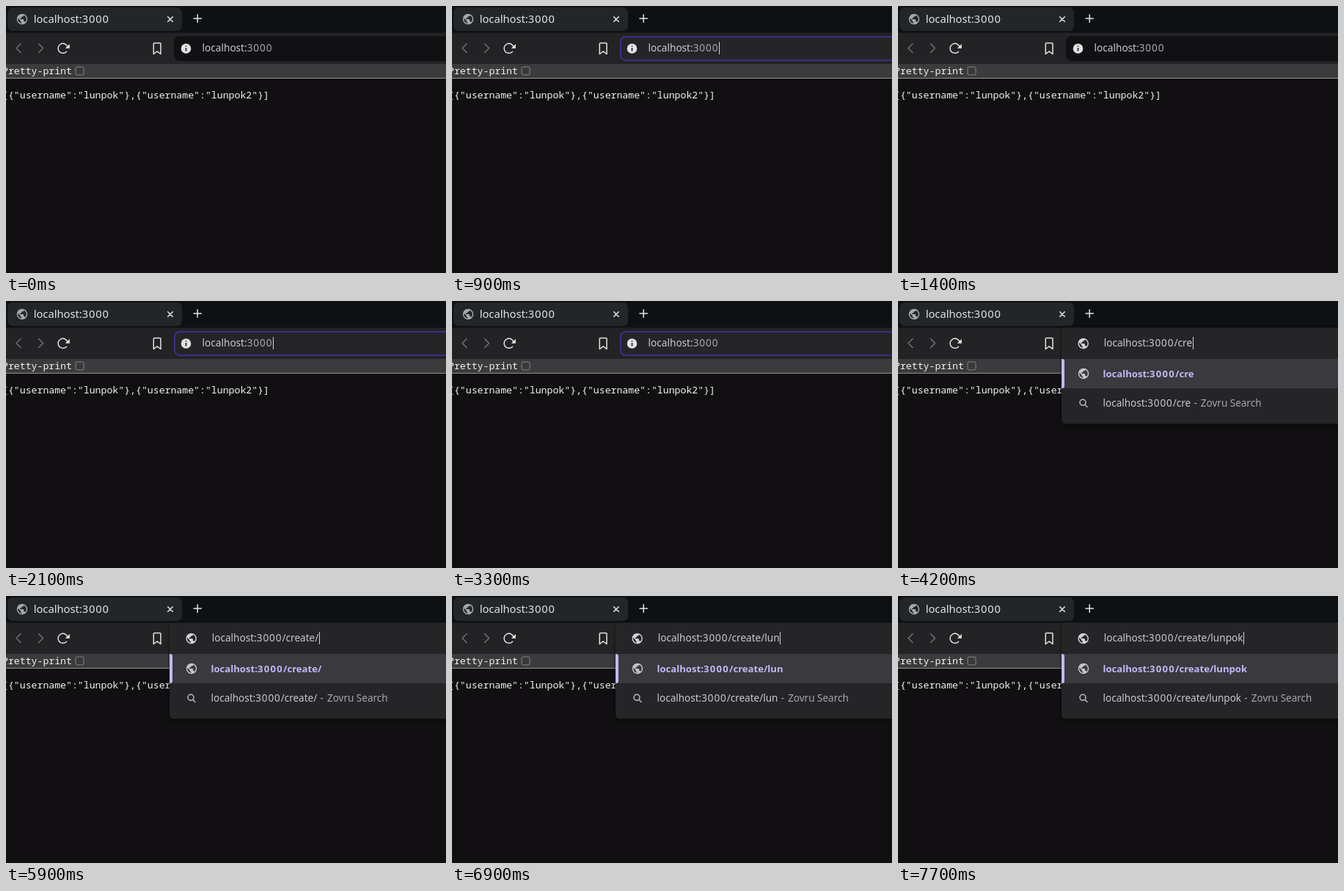
Recreate the animation shown at these times as an HTML page. Size 600 px wide and 364 px high, loop 8 s.

```html
<!DOCTYPE html>
<html lang="en">
<head>
<meta charset="utf-8">
<style>
  html, body { margin: 0; width: 100%; height: 100%; overflow: hidden; background: #110f11; }
  svg { display: block; width: 600px; height: 364px; }
  text { font: 13.6px "Noto Sans", "Open Sans", sans-serif; fill: #cacacd; white-space: pre; }
  .port { letter-spacing: .9px; }
  .tab { font-size: 14.7px; fill: #e2e3e5; }
  .mono { font: 13.2px "Noto Sans Mono", "DejaVu Sans Mono", monospace; fill: #f4f4f4; }
  .match { font-size: 13.1px; font-weight: 700; fill: #bfbaf8; }
  .match .port { letter-spacing: 1.3px; }
  .query { font-size: 13.5px; }
  .dash { letter-spacing: .8px; }
  .dim { fill: #a8a8ac; }
  .line { fill: none; stroke: #e4e4e6; stroke-width: 1.5; stroke-linecap: round; stroke-linejoin: round; }
  .faint { stroke: #717175; }
  .selected, .selected tspan { fill: #101012; }
</style>
</head>
<body>
<svg viewBox="0 0 600 364">
  <defs>
    <path id="globe" transform="scale(.72) translate(-12 -12)" d="M12 2C6.48 2 2 6.48 2 12s4.48 10 10 10 10-4.48 10-10S17.52 2 12 2zm-1 17.93c-3.95-.49-7-3.85-7-7.93 0-.62.08-1.21.21-1.79L9 15v1c0 1.1.9 2 2 2v1.93zm6.9-2.54c-.26-.81-1-1.39-1.9-1.39h-1v-3c0-.55-.45-1-1-1H8v-2h2c.55 0 1-.45 1-1V7h2c1.1 0 2-.9 2-2v-.41c2.93 1.19 5 4.06 5 7.41 0 2.08-.8 3.97-2.1 5.39z"/>
    <filter id="shadow" x="-5%" y="-5%" width="110%" height="115%"><feGaussianBlur stdDeviation="2"/></filter>
  </defs>

  <!-- Tab strip and toolbar -->
  <rect width="600" height="37" fill="#0d1113"/>
  <rect x="2" y="2" width="238" height="32" rx="7" fill="#232629"/>
  <use href="#globe" x="22" y="18" fill="#a6a8ab"/>
  <text class="tab" x="37.700" y="23.300">localhost:<tspan class="port">3000</tspan></text>
  <path class="line" d="M220.700 14.700l6.600 6.600m0-6.600l-6.600 6.600M256 17h10.400m-5.200-5.200v10.400"/>
  <rect y="36.500" width="600" height="42.500" fill="#232325"/>
  <path class="line faint" d="M20 51.500l-6 6 6 6M44.500 51.500l6 6-6 6"/>
  <path class="line" d="M82.500 62.200a6.600 6.600 0 1 1 1.500-6.200"/>
  <path d="M80.800 57.800h6v-6z" fill="#e4e4e6"/>
  <path class="line" d="M201.300 51.500q0-1 1-1h7.700q1 0 1 1v14l-4.850-3.600-4.850 3.600z"/>

  <!-- Page -->
  <rect y="79" width="600" height="19" fill="#3b3a3c"/>
  <rect y="98" width="600" height="1" fill="#929293"/>
  <text class="mono" x="-5" y="93">Pretty-print</text>
  <rect x="95" y="83" width="11" height="11" rx="2" fill="#39383a" stroke="#858587"/>
  <text class="mono" x="-5" y="126">[{"username":"lunpok"},{"username":"lunpok2"}]</text>

  <!-- Address field -->
  <rect id="field" x="230" y="42" width="390" height="32" rx="7" stroke-width="2"/>
  <g id="info">
    <circle cx="245.500" cy="58" r="6.800" fill="#e3e3e5"/>
    <path d="M245.500 57v4.500M245.500 54v1.200" stroke="#202023" stroke-width="1.700"/>
  </g>

  <!-- Suggestions -->
  <g id="popup">
    <rect x="223" y="38" width="390" height="131" rx="5" opacity=".6" filter="url(#shadow)"/>
    <rect x="223" y="36.500" width="390" height="131" rx="5" fill="#252528"/>
    <rect x="223" y="79" width="377" height="40" fill="#3a393d"/>
    <path d="M223 79h1q3 0 3 3v34q0 3-3 3h-1z" fill="#bfbaf8"/>
    <use href="#globe" x="252.700" y="58" fill="#d3d3d6"/>
    <use href="#globe" x="253" y="99" fill="#c4c4c8"/>
    <path class="line" style="stroke:#bcbcc0" d="M255 141.500l3 3M256 138.300a4 4 0 1 1-8 0 4 4 0 0 1 8 0z"/>
    <text class="match" x="279.500" y="103.800">localhost:<tspan class="port">3000</tspan><tspan class="path"></tspan></text>
    <text class="query" x="279.500" y="144.300">localhost:<tspan class="port">3000</tspan><tspan class="path"></tspan><tspan class="dim"><tspan class="dash"> - </tspan>Zovru Search</tspan></text>
  </g>

  <rect id="highlight" x="268" y="48" height="19" fill="#bfbaf8"/>
  <text id="url" y="62.300">localhost:<tspan id="port" class="port">3000</tspan><tspan class="path"></tspan></text>
  <rect id="caret" y="49" width="1" height="17" fill="#d2d2d5"/>
</svg>
<script>
  const LOOP = 8000, BLINK = 500, POPUP = 3700;
  const typed = "/create/lunpok";
  const keyTimes = [3600, 3800, 4000, 4200, 4500, 4600, 4900, 5900, 6500, 6700, 6900, 7200, 7300, 7700];
  const $ = id => document.getElementById(id);
  const show = (id, on) => $(id).setAttribute("visibility", on ? "visible" : "hidden");
  const paths = document.querySelectorAll(".path");
  const within = (t, from, to) => t >= from && t < to;

  function draw(t) {
    const focused = within(t, 900, 1400) || t >= 2100;
    const selected = within(t, 1100, 1400) || within(t, 2300, 2800);
    const open = t >= POPUP;
    const count = keyTimes.filter(k => k <= t).length;

    paths.forEach(p => p.textContent = typed.slice(0, count));
    $("field").setAttribute("fill", focused ? "#252528" : "#111114");
    $("field").setAttribute("stroke", focused ? "#393088" : "#111114");
    show("info", !open);
    show("popup", open);

    const x = open ? 280.7 : 267.6;
    $("url").setAttribute("x", x);
    $("url").setAttribute("class", selected ? "selected" : "");
    $("port").setAttribute("class", count ? "port" : "port dim");
    const width = $("url").getComputedTextLength();
    $("highlight").setAttribute("width", width);
    show("highlight", selected);

    // The caret restarts its blink at every click and key press.
    const start = Math.max(...[900, 2100, 2800, ...keyTimes].filter(k => k <= t));
    $("caret").setAttribute("x", Math.round(x + width + .7));
    show("caret", focused && !selected && (t - start) % (2 * BLINK) < BLINK);
  }

  const origin = performance.now();
  function tick() {
    draw((performance.now() - origin) % LOOP);
    requestAnimationFrame(tick);
  }
  tick();
</script>
</body>
</html>
```
